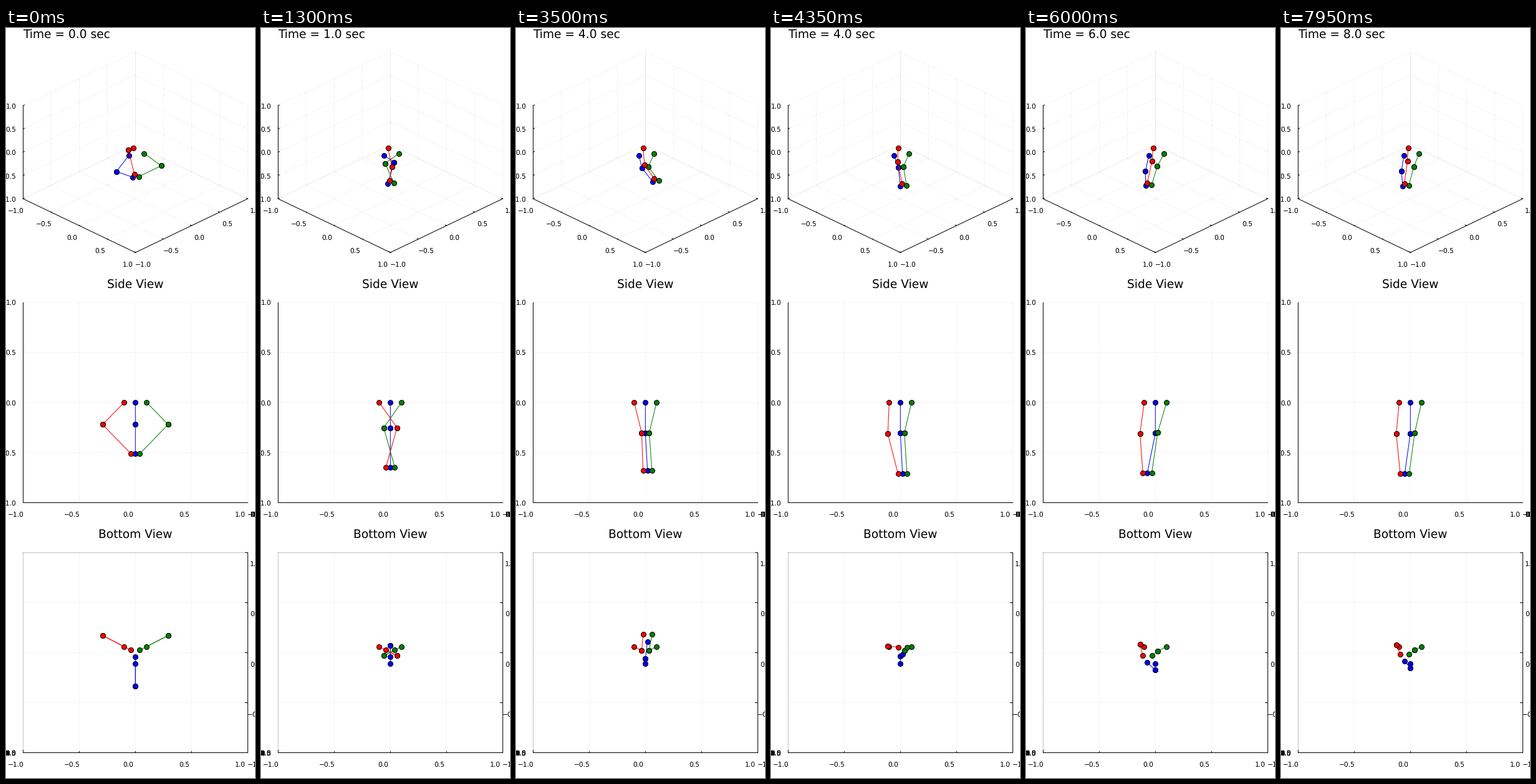
A matplotlib script that plays this animation: 399 px wide and 1200 px high, repeating every 8 s.

```python
import numpy as np
import matplotlib.pyplot as plt
from matplotlib.animation import FuncAnimation

W, H, DPI = 399, 1200, 96
FPS, FRAMES = 20, 160
PX = 72 / DPI  # one pixel in points
TAU = 2 * np.pi

# Delta robot geometry
BASE, PLATE = 0.115, 0.046
UPPER, LOWER = 0.313, 0.411
LEGS = {"blue": 270, "green": 30, "red": 150}
TICKS = (-1, -0.5, 0, 0.5, 1)

# Swing phase around which a knee folds inward; the green one always does
INWARD = {"red": 0.09, "blue": 0.825}

# Each view: origin in pixels, then pixels per unit of x, y, z
VIEWS = [
    (np.array([207.3, 198.7]), np.array([[90, 43], [90, -43], [0, -74.5]])),
    (np.array([207.3, 599.0]), np.array([[180, 0], [0, 0], [0, -160.3]])),
    (np.array([207.3, 999.0]), np.array([[180, 0], [0, -160.3], [0, 0]])),
]

plt.rcParams["font.family"] = "DejaVu Sans"
plt.rcParams["text.hinting"] = "no_hinting"


def direction(degrees):
    return np.array([np.cos(np.radians(degrees)), np.sin(np.radians(degrees))])


OUT = {name: direction(angle) for name, angle in LEGS.items()}


def smoothstep(t, start, end):
    s = np.clip((t - start) / (end - start), 0, 1)
    return s * s * (3 - 2 * s)


def drop_offset(t):
    """Radial knee offset while all legs bounce together."""
    swing = 50.5 * np.exp(-0.22 * t) * np.cos(TAU * t / 0.93)
    return UPPER * np.cos(np.radians(95.5 - swing))


def swing_phase(t):
    """Turns of the pendulum swing, which quickens as it decays."""
    return 0.82 * t + 0.014 * t * t - 0.044


def platform(t):
    """Swing across the centre; its plane turns for a while near 3.5 s."""
    plane = 38 + 45 * np.exp(-((t - 3.5) / 0.9) ** 2)
    size = 0.2 - 0.0125 * t
    return size * np.cos(TAU * swing_phase(t)) * direction(plane)


def leg_plane(name, centre):
    """Radial distance from hip to foot, and lower link length in the plane."""
    x, y = OUT[name]
    side = centre @ np.array([-y, x])
    return PLATE - BASE + centre @ OUT[name], np.sqrt(LOWER ** 2 - side ** 2)


def fold(name, t):
    """Which way the knee bends: -1 inward, 1 outward."""
    if name not in INWARD:
        return -1
    wave = np.cos(TAU * (swing_phase(t) - INWARD[name]))
    return np.clip(8 * (0.6 - wave), -1, 1)


def swing_offset(name, t, centre, depth):
    radial, lower = leg_plane(name, centre)
    dist = np.hypot(radial, depth)
    along = (UPPER ** 2 - lower ** 2 + dist ** 2) / (2 * dist)
    bend = np.sqrt(max(UPPER ** 2 - along ** 2, 0))
    return (along * radial + fold(name, t) * bend * depth) / dist


def joints(t):
    """Hip, knee and foot of every leg, keyed by colour."""
    mix = smoothstep(t, 1.8, 2.2)
    centre = mix * platform(t)
    planes = [leg_plane(name, centre) for name in LEGS]
    deepest = min(np.sqrt((UPPER + low) ** 2 - r * r) for r, low in planes)
    depth = deepest - 0.04 * np.exp(-0.55 * t)

    legs, levels = {}, []
    for name, out in OUT.items():
        q = ((1 - mix) * drop_offset(t)
             + mix * swing_offset(name, t, centre, depth))
        knee = (BASE + q) * out
        knee_z = -np.sqrt(UPPER ** 2 - q * q)
        foot = centre + PLATE * out
        levels.append(knee_z - np.sqrt(LOWER ** 2 - np.sum((foot - knee) ** 2)))
        legs[name] = np.array([[*(BASE * out), 0], [*knee, knee_z], [*foot, 0]])
    for leg in legs.values():
        leg[2, 2] = np.mean(levels)
    return legs


def project(view, pts):
    origin, scale = view
    return origin + np.asarray(pts, float) @ scale


fig = plt.figure(figsize=(W / DPI, H / DPI), dpi=DPI, facecolor="white")
ax = fig.add_axes([0, 0, 1, 1])
ax.set_xlim(0, W)
ax.set_ylim(H, 0)
ax.axis("off")


def segment(view, a, b, **style):
    ax.plot(*project(view, [a, b]).T, lw=PX, **style)


def label(pos, value, ha):
    text = f"{value:.1f}".replace("-", "\u2212")
    ax.text(*pos, text, size=8, ha=ha, va="center_baseline", clip_on=True)


def title(x, y, text, ha="center"):
    return ax.text(x, y, text, size=14, ha=ha, va="baseline")


def draw_box(view):
    grid = dict(color="black", alpha=0.045)
    axis = dict(color="black", solid_capstyle="projecting")
    for v in TICKS:
        # floor and the two back walls
        segment(view, (v, -1, -1), (v, 1, -1), **grid)
        segment(view, (-1, v, -1), (1, v, -1), **grid)
        segment(view, (v, 1, -1), (v, 1, 1), **grid)
        segment(view, (-1, v, -1), (-1, v, 1), **grid)
        segment(view, (-1, 1, v), (1, 1, v), **grid)
        segment(view, (-1, -1, v), (-1, 1, v), **grid)
    segment(view, (-1, -1, -1), (1, -1, -1), **axis)
    segment(view, (1, -1, -1), (1, 1, -1), **axis)
    segment(view, (-1, -1, -1), (-1, -1, 1), **axis)
    for v in TICKS:
        segment(view, (v, -1, -1), (v, -0.988, -1), color="black")
        segment(view, (1, v, -1), (0.975, v, -1), color="black")
        segment(view, (-1, -1, v), (-1, -0.975, v), color="black")
        label(project(view, (v, -1, -1)) + (-12, 18.3), v, "center")
        label(project(view, (1, v, -1)) + (12, 18.3), v, "center")
        label(project(view, (-1, -1, v)) + (-11, 0.3), v, "right")


for view in VIEWS:
    draw_box(view)

clock = title(27.3, 16, "", "left")
title(207.3, 416, "Side View")
title(207.3, 816, "Bottom View")

links = []
for view in VIEWS:
    for name in LEGS:
        for part in (slice(0, 2), slice(1, 3)):
            line, = ax.plot([], [], "-o", color=name, lw=PX, ms=8 * PX,
                            mec="black", mew=PX, zorder=3, snap=False)
            links.append((line, view, name, part))


def update(n):
    t = n / FPS
    legs = joints(t)
    for line, view, name, part in links:
        line.set_data(*project(view, legs[name][part]).T)
    clock.set_text(f"Time = {np.round(t):.1f} sec")
    return [clock] + [link[0] for link in links]


anim = FuncAnimation(fig, update, frames=FRAMES, interval=1000 / FPS,
                     repeat=True, repeat_delay=0)
plt.show()
```
